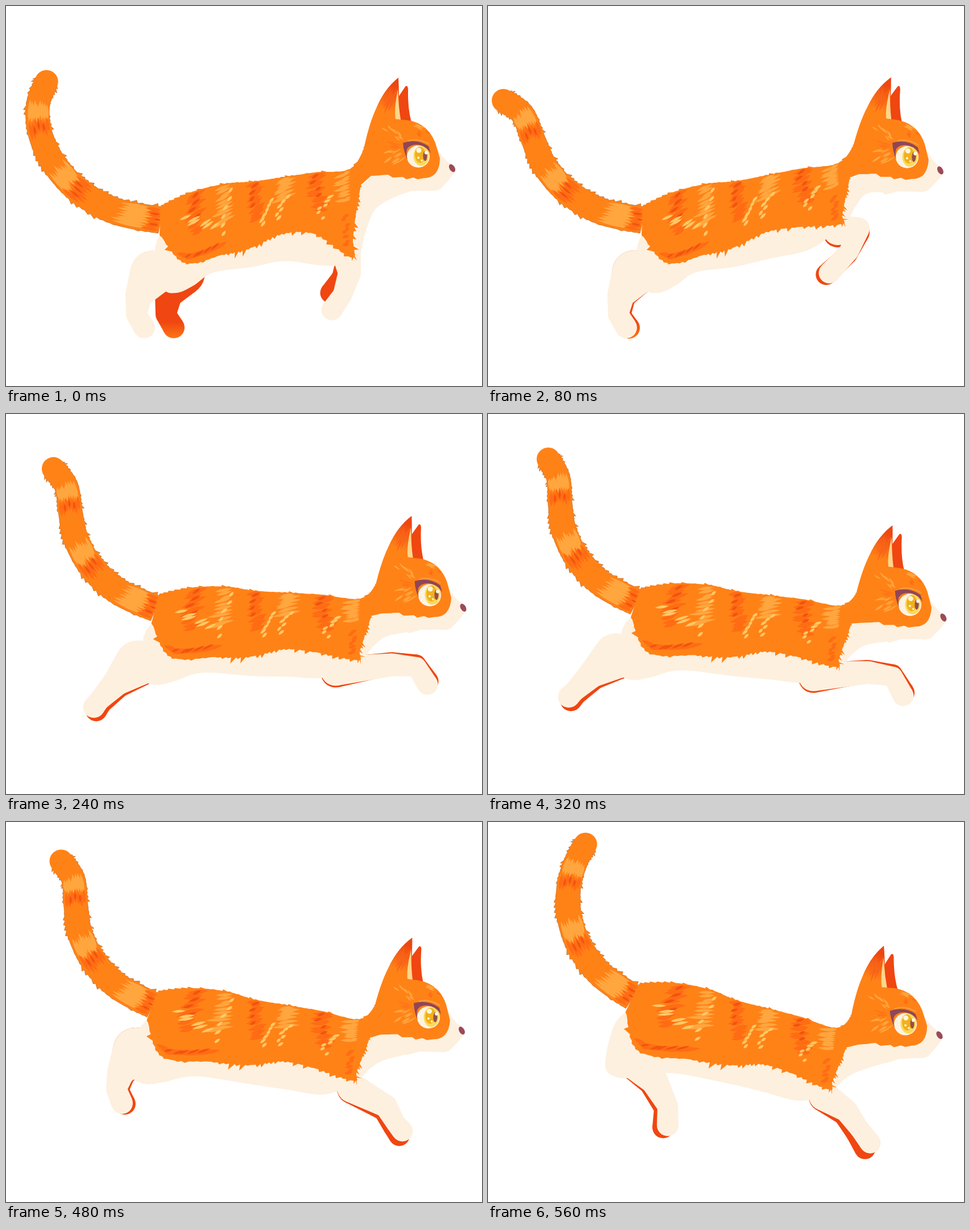
Recreate the animation shown at these times as an HTML page. Size 837 px wide and 669 px high, loop 640 ms.

```html
<!DOCTYPE html>
<html lang="en">
<head>
<meta charset="utf-8">
<title>Running cat</title>
<style>
html, body { margin: 0; width: 100%; height: 100%; overflow: hidden; background: #fff; }
svg { display: block; width: 100%; height: 100%; }
</style>
</head>
<body>
<svg viewBox="0 0 837 669">
  <defs>
    <linearGradient id="ear" gradientUnits="userSpaceOnUse" x1="690" y1="126" x2="668" y2="196">
      <stop offset=".2" stop-color="#ee4610"/><stop offset=".85" stop-color="#ff8217"/>
    </linearGradient>
    <linearGradient id="paw" gradientUnits="userSpaceOnUse" x1="0" y1="556" x2="0" y2="592">
      <stop offset="0" stop-color="#f04611"/><stop offset="1" stop-color="#ff8217"/>
    </linearGradient>
  </defs>
  <g id="body"></g>
  <g id="head">
    <path fill="#f04611" d="M690 201Q688 160 692 157L702 142Q706 138 707 146Q706 180 713 205Z"/>
    <path fill="#fdf0df" d="M752 236Q761 264 783 279L789 292Q780 306 764 322Q757 326 745 325L712 326L690 333L650 305Z"/>
    <path fill="url(#ear)" d="M627 262Q637 210 651 180Q665 146 690 126Q692 160 690 200Q739 199 755 241L763 268Q763 285 755 295Q747 303 735 303L724 305L716 302L704 305L698 301L680 302L672 297L640 299Z"/>
    <path fill="#ffd68c" d="M689 147Q682 182 685 199L694 200Q690 175 689 147Z"/>
    <g id="face"></g>
    <path fill="none" stroke="#f3a044" stroke-width="2" d="M706 238Q722 231 744 243"/>
    <ellipse cx="725" cy="265" rx="20" ry="19.5" fill="#fdf3e2"/>
    <ellipse cx="730" cy="264" rx="13.5" ry="17.5" fill="#fbd95a"/>
    <ellipse cx="728" cy="262" rx="9" ry="14" fill="#f2b01c"/>
    <ellipse cx="737" cy="264" rx="3.6" ry="9" fill="#96504a"/>
    <g fill="#fff6dc"><circle cx="726" cy="254" r="4.5"/><circle cx="739" cy="258" r="3.2"/><circle cx="725" cy="267" r="2"/><circle cx="731" cy="272" r="1.8"/></g>
    <path fill="#8f4658" d="M698 241Q723 233 743 247L747 259Q738 245 722 244Q710 244 705 252Q703 259 706 270Q699 256 698 241Z"/>
    <ellipse cx="784.5" cy="285.5" rx="4.6" ry="7.6" transform="rotate(-32 784.5 285.5)" fill="#9b4a5a"/>
  </g>
</svg>
<script>
const ORANGE = '#ff8217', CREAM = '#fdf0df', RED = '#f04611';
const LIGHT = '#ffa63f', DARK = '#ff6c14', SPOT = '#f2530f', PALE = '#ffc866';
const STEPS = [0, 1, 2, 2.5, 3, 3.5, 4, 5], STEP_MS = 80;

// slope: tilt of the spine; reach: lift of the chest; head: eye x, y, tilt;
// tail: base angle, tip curl, bone length; fore, hind: four joints;
// far legs: shift x, y and turn against the near leg.
const POSES = [
  { slope: 0, reach: 0, head: [725, 264, 0], tail: [11, 9, 80],
    fore: [598,432, 604,470, 592,508, 573,535], farFore: [-2, -30, 0],
    hind: [258,470, 234,508, 229,543, 243,566], farHind: [52, 0, 0] },
  { slope: -.057, reach: 1, head: [737, 265, 2.8], tail: [12, -67, 74],
    fore: [615,395, 651,392, 635,432, 600,470], farFore: [0, 4, 4],
    hind: [258,470, 234,508, 229,543, 243,566], farHind: [0, 0, -3] },
  { slope: .145, reach: 1, head: [748, 301, 1], tail: [20, -64, 72],
    fore: [587,443, 690,428, 732,428, 752,456], farFore: [0, 3, -3],
    hind: [238,451, 206,486, 176,520, 167,534], farHind: [0, 2, -3] },
  { slope: .28, reach: 1, head: [742, 335, 1.8], tail: [28, -56, 68],
    fore: [572,462, 668,455, 712,462, 730,496], farFore: [0, 3, -3],
    hind: [225,426, 184,457, 152,488, 142,498], farHind: [0, 2, -3] },
  { slope: .335, reach: 1, head: [743, 343, 2.6], tail: [28, -62, 69],
    fore: [608,468, 668,500, 685,530, 697,544], farFore: [0, 2, 4],
    hind: [228,402, 202,440, 194,470, 204,495], farHind: [0, 0, -3] },
  { slope: .42, reach: 1, head: [734, 355, -1.2], tail: [35, -7, 69],
    fore: [590,482, 630,508, 653,540, 672,565], farFore: [0, 2, 6],
    hind: [250,405, 292,455, 316,500, 316,534], farHind: [0, 0, 3.5] }];

// Trunk at rest.
const BACK = [[272,352], [325,328], [385,313], [435,309], [490,301], [543,293], [605,287]];
const UNDER = [[270,402], [315,452], [380,438], [430,426], [485,401], [545,402], [608,443]];
const CHEST = [[624,315], [616,360], [610,410]];
const BELLY = [[652,355], [632,398], [615,450], [560,457], [490,449], [430,460], [365,469],
  [330,492], [300,505], [275,495], [262,430], [275,395]];

const $ = id => document.getElementById(id);
const mix = (a, b, t) => a + (b - a) * t;
const mixPt = (p, q, t) => [mix(p[0], q[0], t), mix(p[1], q[1], t)];
const rad = deg => deg * Math.PI / 180;
const fix = p => p.map(n => n.toFixed(1)).join(' ');
const polygon = pts => 'M' + pts.map(fix).join('L') + 'Z';
const path = (d, fill, extra = '') => `<path d="${d}" fill="${fill}" ${extra}/>`;

function random(seed) {
  return () => (seed = (seed * 16807) % 2147483647) / 2147483647;
}
function poseAt(k) {
  const a = POSES[Math.floor(k)], b = POSES[Math.ceil(k)], out = {};
  for (const key in a) {
    out[key] = Array.isArray(a[key]) ? a[key].map((n, i) => mix(n, b[key][i], k % 1)) : mix(a[key], b[key], k % 1);
  }
  return out;
}
function turn([x, y], [cx, cy], deg) {
  const c = Math.cos(rad(deg)), s = Math.sin(rad(deg));
  return [cx + (x - cx) * c - (y - cy) * s, cy + (x - cx) * s + (y - cy) * c];
}
// Moves a trunk point: the rump turns, the front tilts, stretches and lifts.
function bender({ slope, reach, head }) {
  const rear = Math.max(0, slope) * 1.06, stretch = (head[0] - 725) / 200;
  return ([x, y]) => {
    const d = x - 425, rump = Math.max(0, Math.min(1, (440 - x) / 110));
    if (d < 0) return [x - rear * rump * (y - 340), y + rear * d];
    const lift = 50 * reach * (Math.max(0, Math.min(x, 630) - 480) / 128) ** 2 * ((y - 290) / 155) ** 2;
    return [x + stretch * d - slope * .25 * (y - 290) * d / 180, y + slope * d - lift];
  };
}
// Point on a Catmull-Rom curve; t counts the points.
function at(pts, t) {
  const last = pts.length - 1;
  t = Math.max(0, Math.min(last, t));
  const i = Math.min(last - 1, Math.floor(t)), f = t - i;
  const [a, b, c, d] = [-1, 0, 1, 2].map(o => pts[Math.max(0, Math.min(last, i + o))]);
  return [0, 1].map(j => b[j] + f / 2 * (c[j] - a[j] + f * (2 * a[j] - 5 * b[j] + 4 * c[j] - d[j]
    + f * (3 * (b[j] - c[j]) + d[j] - a[j]))));
}
function sample(pts, n) {
  return Array.from({ length: (pts.length - 1) * n + 1 }, (_, i) => at(pts, i / n));
}
// Raises every second sample to a tuft beside the line.
function fur(line, amp, lean, rnd) {
  return line.map((p, i) => {
    if (i % 2 === 0 || i === line.length - 1) return p;
    const a = line[i - 1], b = line[i + 1];
    const dx = b[0] - a[0], dy = b[1] - a[1], d = Math.hypot(dx, dy) || 1;
    const r = rnd() ** 2, h = amp * r, l = lean * r;
    return [p[0] + (dx * l - dy * h) / d, p[1] + (dx * h + dy * l) / d];
  });
}
function leaf(p, q, w, fill) {
  const [mx, my] = mixPt(p, q, .5), dx = q[0] - p[0], dy = q[1] - p[1];
  const k = w / (Math.hypot(dx, dy) || 1);
  return path(`M${fix(p)}Q${fix([mx - dy * k, my + dx * k])} ${fix(q)}Q${fix([mx + dy * k, my - dx * k])} ${fix(p)}`, fill);
}

// A leg is a row of circles joined along their tangents.
function limb(flat, radii, fill, [dx, dy, deg] = [0, 0, 0]) {
  const root = flat.slice(0, 2);
  const joints = radii.map((_, i) => turn([flat[2 * i], flat[2 * i + 1]], root, deg)).map(p => [p[0] + dx, p[1] + dy]);
  return joints.map((p, i) => {
    const r = radii[i], q = joints[i + 1], s = radii[i + 1];
    const ball = `<circle cx="${p[0]}" cy="${p[1]}" r="${r}" fill="${fill}"/>`;
    if (!q) return ball;
    const a = Math.atan2(q[1] - p[1], q[0] - p[0]);
    const b = Math.acos(Math.max(-1, Math.min(1, (r - s) / Math.hypot(q[0] - p[0], q[1] - p[1]))));
    const rim = (c, size, t) => [c[0] + size * Math.cos(t), c[1] + size * Math.sin(t)];
    return ball + path(polygon([rim(p, r, a + b), rim(q, s, a + b), rim(q, s, a - b), rim(p, r, a - b)]), fill);
  }).join('');
}

function drawTail({ tail: [base, curl, bone] }, bend, rnd) {
  const mid = [bend([272, 377])];
  for (let i = 0; i < 6; i++) {
    const a = rad(base + 18 * i + curl * Math.max(0, (i - 3) / 2) ** 2), len = bone * (1 - .09 * i);
    mid.push([mid[i][0] - len * Math.cos(a), mid[i][1] - len * Math.sin(a)]);
  }
  const place = (t, side) => {
    const p = at(mid, t), a = at(mid, t - .05), b = at(mid, t + .05);
    const dx = b[0] - a[0], dy = b[1] - a[1], w = side * (23.5 - t * .6) / (Math.hypot(dx, dy) || 1);
    return [p[0] - dy * w, p[1] + dx * w];
  };
  const edge = side => Array.from({ length: 81 }, (_, i) => place(i * .075, side));
  const outline = [...fur(edge(1), 5, -4, rnd), ...fur(edge(-1).reverse(), 5, 4, rnd)];
  let out = path(polygon(outline), ORANGE, 'stroke="#8a4312" stroke-width=".4"')
    + `<circle cx="${mid[6][0]}" cy="${mid[6][1]}" r="20.5" fill="${ORANGE}"/>`;
  const ring = (t, half, n, spread, w, fill) => {
    for (let i = 0; i < n; i++) {
      const side = mix(-spread, spread, i / (n - 1)), mid = t + (rnd() - .5) * .2;
      out += leaf(place(Math.max(0, mid - half), side), place(mid + half, side), w, fill);
    }
  };
  for (const t of [.65, 2.55, 4.75]) {
    ring(t, .36, 8, .75, 6.5, LIGHT);
    ring(t - .5, .28, 7, .75, 6, DARK);
    ring(t - .5, .15, 3, .4, 4, SPOT);
  }
  return out;
}

function drawCoat(bend, onHead, rnd) {
  const back = BACK.map(bend), under = UNDER.map(bend);
  const lower = [...CHEST.map(bend), ...under.slice().reverse()];
  const neck = sample([...back, onHead(632, 246)], 12);
  const outline = [...fur(neck, -3, -4, rnd), onHead(665, 240), onHead(660, 298), onHead(642, 299),
    ...fur(sample(lower, 14), -11, 6, rnd)];
  let out = path(polygon(outline), ORANGE);
  const place = (u, v) => mixPt(at(back, u), at(under, u), Math.max(.02, v));
  // Brush strokes along a line from u0, v0 to u1, v1 in trunk space.
  const strokes = (u0, v0, u1, v1, n, len, w, fill) => {
    for (let i = 0; i < n; i++) {
      const f = i / (n - 1), u = mix(u0, u1, f) + (rnd() - .5) * .2, v = mix(v0, v1, f);
      const half = len * (.35 + rnd() * .3);
      out += leaf(place(u - half, v + .035), place(u + half, v - .035), w, fill);
    }
  };
  for (const u of [2, 4, 5.85]) strokes(u, .04, u, u < 3 ? .55 : .38, 11, .55, 5.5, LIGHT);
  for (const u of [1.15, 3.05, 5]) {
    strokes(u, .04, u + .1, .58, 13, .42, 7, DARK);
    strokes(u, .06, u, .36, 4, .22, 5, SPOT);
  }
  for (const u of [2.05, 3.4, 3.95, 5.2]) strokes(u + .12, u < 3 ? .1 : .36, u - .1, .7, 6, .14, 5, PALE);
  strokes(.95, .36, 1.7, .56, 6, .3, 5, PALE);
  strokes(1, .92, 1.9, .86, 12, .4, 7, DARK);
  strokes(1.1, .9, 1.8, .85, 5, .22, 4, SPOT);
  strokes(5.75, .55, 5.85, .9, 8, .2, 6, DARK);
  return out;
}

function drawWhite(bend, onHead) {
  const inside = [[330,390], [435,370], [590,350]].map(bend);
  const edge = sample([onHead(700, 329), ...BELLY.map(bend)], 8);
  return path(polygon([...edge, ...inside, onHead(655, 288), onHead(712, 300)]), CREAM);
}

function drawFace() {
  const rnd = random(77);
  const patch = (x, y, rx, ry, n, len, angle, fill) => {
    let out = '';
    for (let i = 0; i < n; i++) {
      const px = x + (rnd() * 2 - 1) * rx, py = y + (rnd() * 2 - 1) * ry, a = angle + (rnd() - .5) * .5;
      const dx = Math.cos(a) * len / 2, dy = Math.sin(a) * len / 2;
      out += leaf([px - dx, py - dy], [px + dx, py + dy], 2.5, fill);
    }
    return out;
  };
  $('face').innerHTML = patch(680, 228, 14, 14, 8, 14, .7, LIGHT) + patch(682, 268, 14, 12, 12, 18, -.4, LIGHT)
    + patch(682, 243, 14, 6, 5, 18, .2, '#ff7418') + patch(720, 212, 12, 4, 8, 10, .5, LIGHT)
    + patch(733, 224, 8, 5, 4, 10, .8, DARK) + patch(676, 168, 8, 12, 8, 30, -1.15, '#f8631a');
}

function draw(k) {
  const pose = poseAt(k), rnd = random(4242), bend = bender(pose), [x, y, tilt] = pose.head;
  const onHead = (px, py) => turn([px + x - 725, py + y - 264], [x, y], tilt);
  const foreSize = [26, 20, 17, 18.5], hindSize = [40, 24, 18, 19];
  $('body').innerHTML = limb(pose.hind, hindSize, 'url(#paw)', pose.farHind)
    + limb(pose.fore, foreSize, RED, pose.farFore)
    + drawWhite(bend, onHead) + limb(pose.hind, hindSize, CREAM) + limb(pose.fore, foreSize, CREAM)
    + drawTail(pose, bend, rnd) + drawCoat(bend, onHead, rnd);
  $('head').setAttribute('transform', `translate(${x} ${y}) rotate(${tilt}) translate(-725 -264)`);
}

const start = performance.now();
let shown = -1;
function tick() {
  const step = Math.floor((performance.now() - start) / STEP_MS) % STEPS.length;
  if (step !== shown) draw(STEPS[shown = step]);
  requestAnimationFrame(tick);
}
drawFace();
tick();
</script>
</body>
</html>
```
